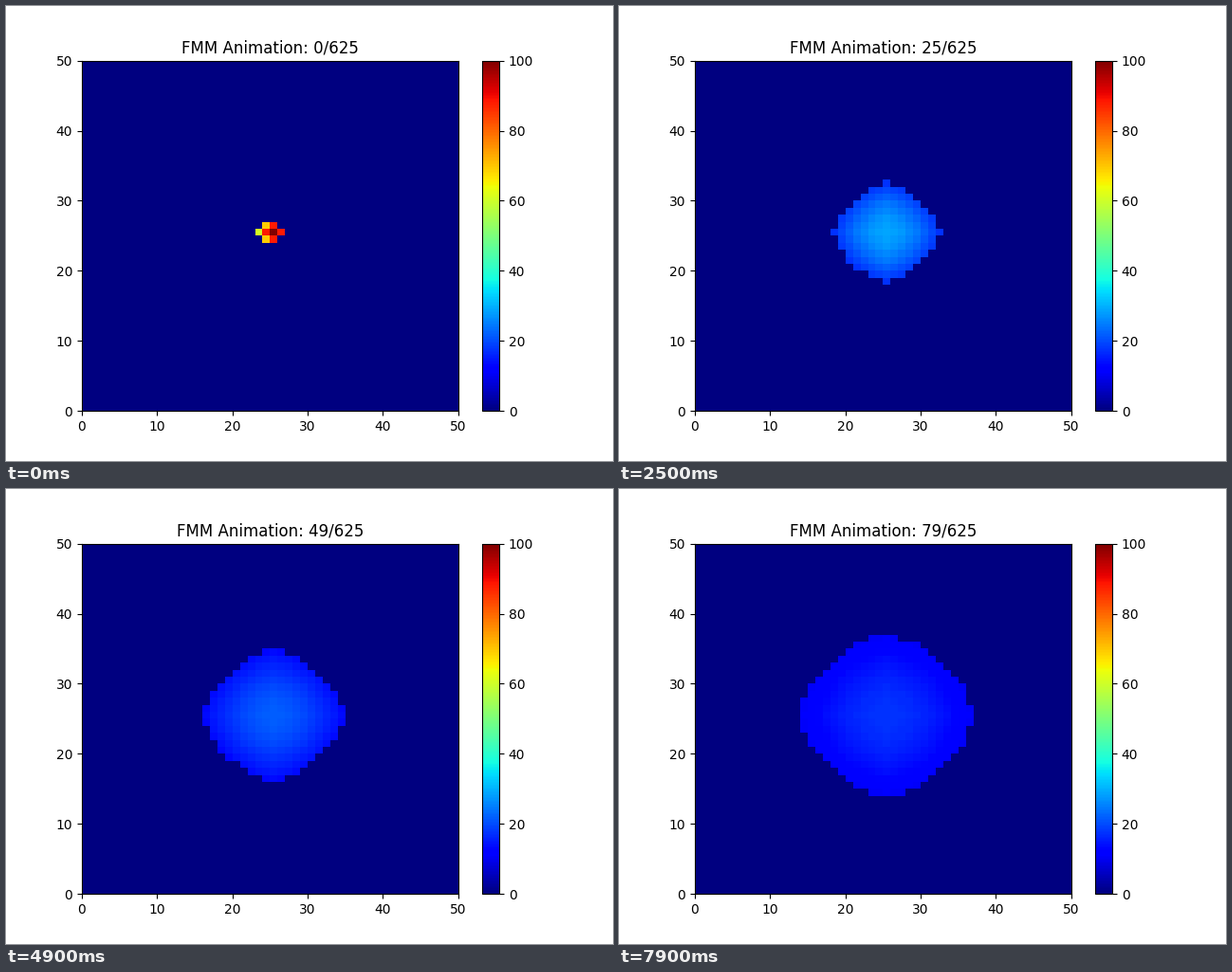
Write a matplotlib script that moves like this. It is 640 px wide and 480 px high and loops after 8 s.

```python
import itertools

import matplotlib.pyplot as plt
import numpy as np
from matplotlib.animation import FuncAnimation

N = 50
START = (25, 25)
STEPS = 625
FRAMES = 80
POPS = 4


def neighbours(x, y):
    for dx, dy in ((-1, 0), (1, 0), (0, -1), (0, 1)):
        if 0 <= x + dx < N and 0 <= y + dy < N:
            yield x + dx, y + dy


def arrival(times, x, y):
    """First-order upwind solution of the eikonal equation at unit speed."""
    def at(i, j):
        return times[i, j] if 0 <= i < N and 0 <= j < N else np.inf

    a = min(at(x - 1, y), at(x + 1, y))
    b = min(at(x, y - 1), at(x, y + 1))
    if abs(a - b) < 1:
        return (a + b + np.sqrt(2 - (a - b) ** 2)) / 2
    return min(a, b) + 1


def march():
    """Yield the arrival times after each accepted cell."""
    times = np.full((N, N), np.inf)
    times[START] = 0
    trial, accepted = {START}, set()
    while trial:
        # round so that symmetric cells tie and go in index order
        cell = min(trial, key=lambda c: (round(times[c], 9), c))
        trial.remove(cell)
        accepted.add(cell)
        for nb in neighbours(*cell):
            if nb not in accepted:
                times[nb] = min(times[nb], arrival(times, *nb))
                trial.add(nb)
        yield times.copy()


def pressure(times):
    """Spreading Gaussian whose width follows the front."""
    front = times[np.isfinite(times)].max()
    return 200 / front * np.exp(-times ** 2 / (2 * front ** 2))


fields = [pressure(t) for t in
          itertools.islice(march(), 1, 2 + POPS * (FRAMES - 1), POPS)]

fig, ax = plt.subplots(figsize=(6.4, 4.8), dpi=100)
mesh = ax.pcolormesh(fields[0].T, cmap="jet", vmin=0, vmax=100)
fig.colorbar(mesh, ax=ax)
title = ax.set_title("")


def draw(k):
    mesh.set_array(fields[k].T)
    title.set_text(f"FMM Animation: {k}/{STEPS}")
    return mesh, title


anim = FuncAnimation(fig, draw, frames=FRAMES, interval=100,
                     repeat=True, repeat_delay=0)
plt.show()
```
